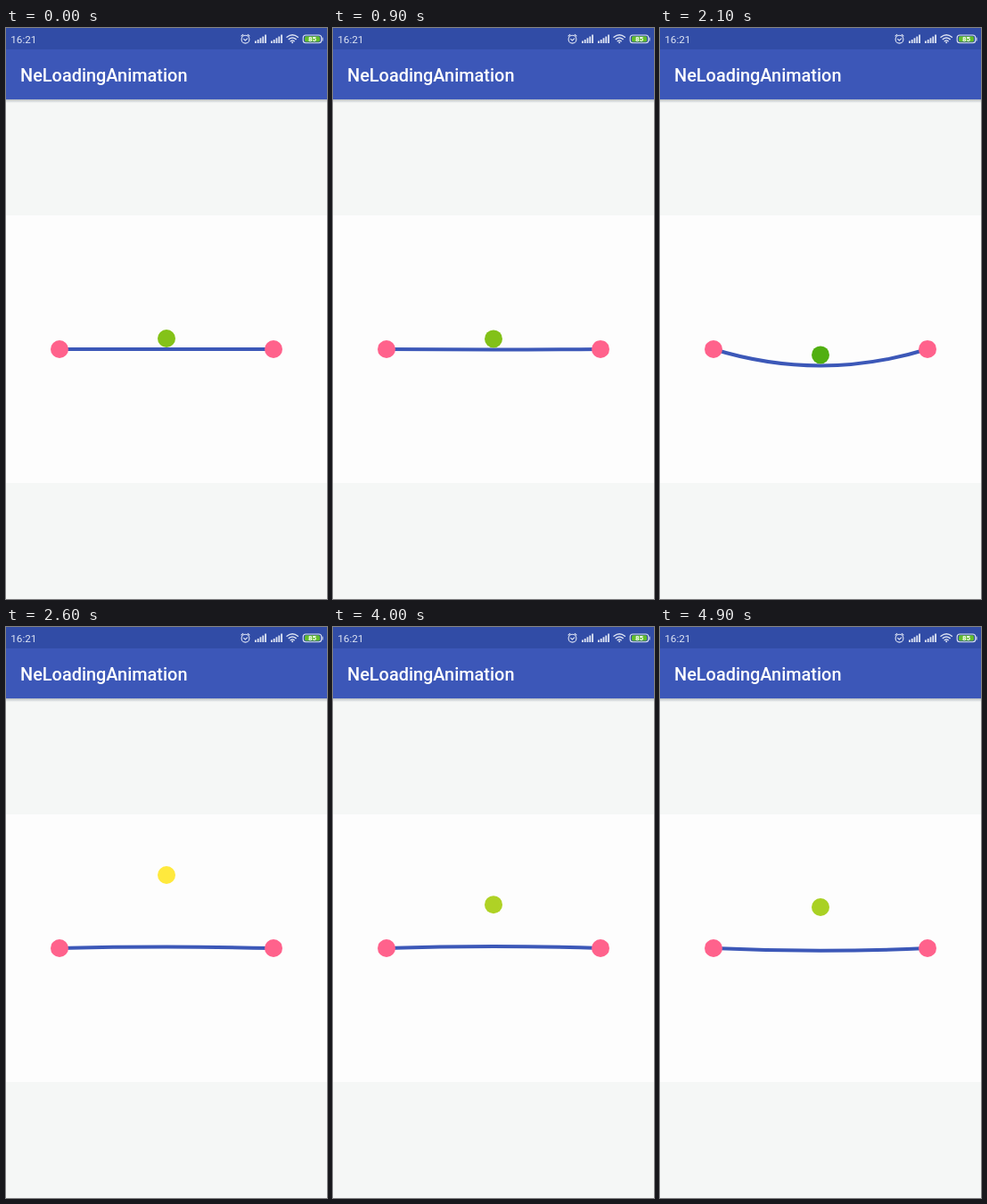
An HTML page that plays this animation: 360 by 640 pixels, repeating every 5 s.

```html
<!DOCTYPE html>
<html lang="en">
<head>
<meta charset="utf-8">
<title>Loading animation</title>
<style>
  html, body { margin: 0; width: 100%; height: 100%; overflow: hidden; background: #f5f7f6; }
  svg { display: block; width: 100vw; height: 100vh; }
  text { font-family: Roboto, sans-serif; fill: #fff; }
</style>
</head>
<body>
<svg viewBox="0 0 360 640">
  <defs>
    <linearGradient id="shade" x2="0" y2="1">
      <stop stop-color="#b9bdc2"/>
      <stop offset="1" stop-color="#f5f7f6"/>
    </linearGradient>
    <path id="signal" fill="#dfe5f4" d="M0 14.5h1.8V17H0zM2.8 13h1.8v4H2.8zM5.6 11.3h1.8V17H5.6zM8.4 9.5h1.8V17H8.4zM11.2 7.5H13V17h-1.8z"/>
  </defs>

  <rect width="360" height="640" fill="#f5f7f6"/>
  <rect y="210" width="360" height="300" fill="#fdfdfd"/>
  <rect y="80" width="360" height="4" fill="url(#shade)"/>
  <rect y="24" width="360" height="56" fill="#3c57b8"/>
  <rect width="360" height="24" fill="#314ca6"/>

  <text x="5.3" y="17" font-size="11.7" style="fill:#dfe5f4">16:21</text>
  <text x="16" y="59.5" font-size="19.9" font-weight="500">NeLoadingAnimation</text>

  <g fill="none" stroke="#dfe5f4" stroke-width="1.1" stroke-linecap="round">
    <circle cx="268.5" cy="12.7" r="4.4"/>
    <path d="M264 9l1.8-1.7M273 9l-1.8-1.7M266.6 12.4l1.7 1.6 2.4-2.2"/>
    <path stroke-width="1.4" d="M315 10.3q6.2-5 12.4 0M317.2 12.6q4-3.2 8 0M319.2 14.7q2-1.6 4 0"/>
    <rect x="333.2" y="8" width="20.6" height="8.8" rx="3"/>
    <path d="M355 11v3"/>
  </g>
  <circle cx="321.2" cy="16.2" r="1" fill="#dfe5f4"/>
  <use href="#signal" x="279"/>
  <use href="#signal" x="297"/>
  <rect x="335" y="9.3" width="17" height="6.2" rx="1.5" fill="#62bd2b"/>
  <text x="343.5" y="15.4" font-size="8" font-weight="700" text-anchor="middle">85</text>

  <path id="string" fill="none" stroke="#3c58b8" stroke-width="4"/>
  <circle cx="60" cy="360" r="10" fill="#ff628c"/>
  <circle cx="300" cy="360" r="10" fill="#ff628c"/>
  <circle id="ball" cx="180" r="10"/>
</svg>
<script>
const LOOP = 5000, STEP = 100;
const DOWN = 500, SPRING = 700, LAUNCH = DOWN + SPRING * Math.PI / 20;
const DEPTH = 50, HEIGHT = 70;
const starts = [291, 1527, 2791, 4053, 5293];

// Ball colour by height above the resting string
const shades = [
  [-50, 63, 168, 12], [-13, 84, 176, 18], [0, 132, 194, 24],
  [35, 170, 209, 36], [70, 255, 233, 61]
];
const string = document.getElementById("string");
const ball = document.getElementById("ball");

function shade(h) {
  let i = 1;
  while (i < shades.length - 1 && h > shades[i][0]) i++;
  const a = shades[i - 1], b = shades[i];
  const k = Math.min(1, Math.max(0, (h - a[0]) / (b[0] - a[0])));
  const mix = c => Math.round(a[c] + (b[c] - a[c]) * k);
  return `rgb(${mix(1)},${mix(2)},${mix(3)})`;
}

// Returns the sag of the string and the height of the ball
function pose(t) {
  if (t < starts[0]) return [0, 0];
  let i = 0;
  while (t >= starts[i + 1]) i++;
  const s = t - starts[i];
  if (s < DOWN) {
    const sag = DEPTH * (1 - (1 - s / DOWN) ** 2);
    return [sag, -sag];
  }
  const x = Math.min(1, (s - DOWN) / SPRING);
  const sag = DEPTH * Math.exp(-3 * x) * Math.cos(10 * x);
  if (s < LAUNCH) return [sag, -sag];
  const flight = starts[i + 1] - starts[i] - LAUNCH;
  const u = ((s - LAUNCH) / flight) ** 2;
  return [sag, 4 * HEIGHT * u * (1 - u)];
}

function draw(now) {
  const t = Math.floor(now % LOOP / STEP) * STEP;
  const [sag, h] = pose(t);
  string.setAttribute("d", `M60 360Q180 ${360 + 2 * sag} 300 360`);
  ball.setAttribute("cy", 348 - h);
  ball.setAttribute("fill", shade(h));
  requestAnimationFrame(draw);
}
draw(0);
</script>
</body>
</html>
```
